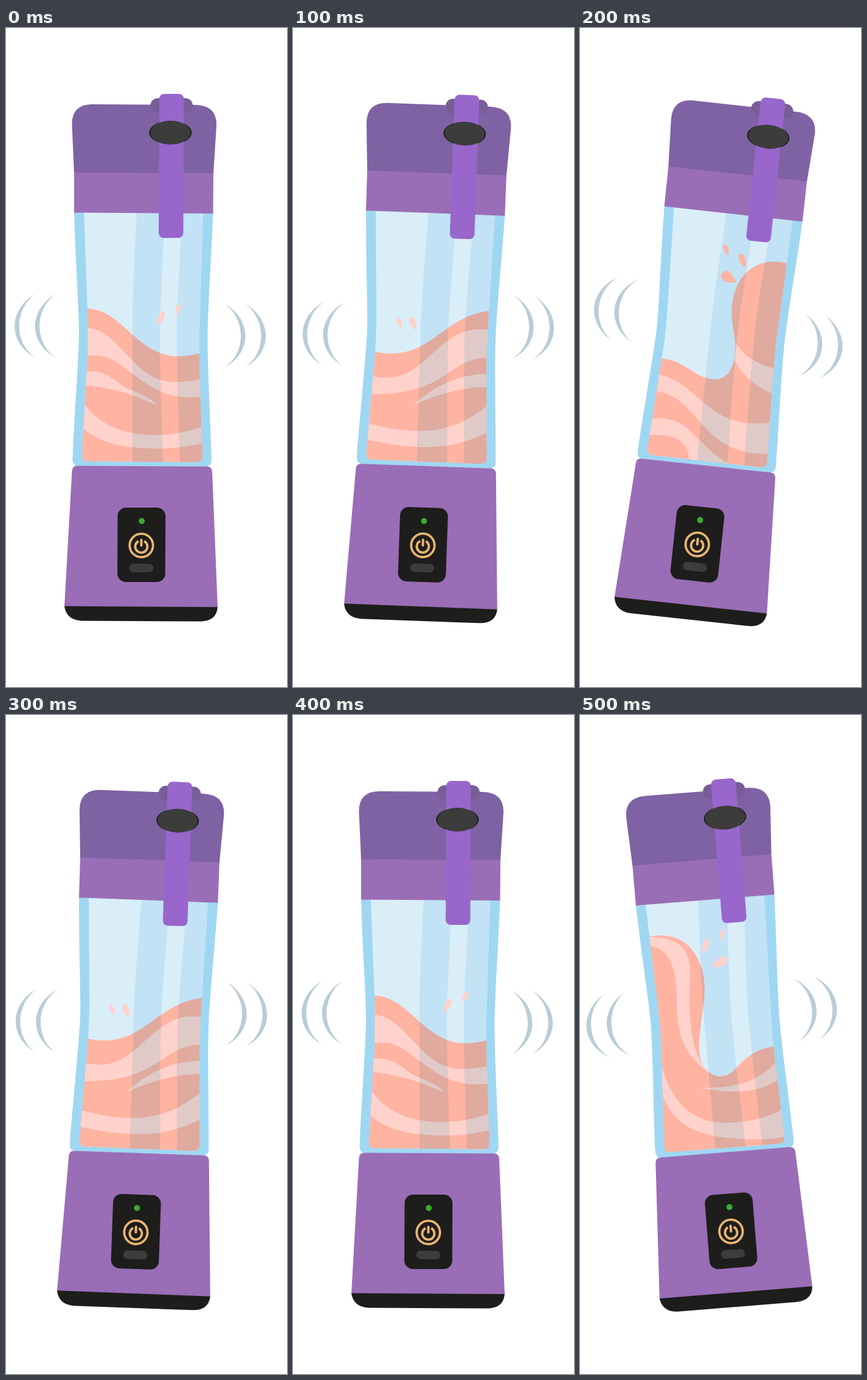
Write an HTML page that moves like this. It is 462 by 1080 pixels and loops after 600 ms.

```html
<!DOCTYPE html>
<html lang="en">
<head>
<meta charset="utf-8">
<title>Shaking blender bottle</title>
<style>
  html, body { margin: 0; width: 100%; height: 100%; overflow: hidden; background: #fff; }
  svg { display: block; width: 100%; height: 100%; }
  .plain { --liquid: #ffb3a1; --foam: #ffd2cb; }
  .shaded { --liquid: #e0aa9e; --foam: #dfcac8; }
  .liquid { fill: var(--liquid); }
  .foam { fill: var(--foam); }
</style>
</head>
<body>
<svg viewBox="0 0 462 1080">
  <defs>
    <clipPath id="inside">
      <path d="M128 302L133 435Q136 500 134 540L125 700Q125 710 134 710L313 711.5Q323 711 323 702L318 560Q317 510 318.5 480L324 303Z"/>
    </clipPath>
    <path id="bands" d="M215 302C211 380 208 440 208 500V712H258C256 640 253 570 253 500C253 460 258 380 261 303ZM290 303C286 380 281 450 281 500C281 570 284 640 286 712H330V303Z"/>
    <clipPath id="bandClip"><use href="#bands"/></clipPath>
    <path id="wave" d="M48 436C3 462 3 516 48 540C13 516 13 462 48 436Z"/>
    <g id="waves"><use href="#wave"/><use href="#wave" x="33.5"/></g>
  </defs>

  <g id="bottle">
    <g fill="#bacdd6">
      <g id="leftWaves"><use href="#waves"/></g>
      <g id="rightWaves"><use href="#waves" transform="translate(441.3 16) scale(-1 1)"/></g>
    </g>

    <path fill="#9fd7f2" d="M112 302C115 400 120 460 120 495C120 540 112 640 109.5 706Q109 718 120 718L329 718.8Q338 718 338 708C336 640 331.5 560 331.5 510C331.5 465 337 390 340.500 303Z"/>
    <g clip-path="url(#inside)">
      <rect x="100" y="300" width="250" height="420" fill="#daeef8"/>
      <use href="#bands" fill="#c2e2f5"/>
      <g class="plain"><g class="contents"></g></g>
      <g class="shaded" clip-path="url(#bandClip)"><g class="contents"></g></g>
      <g id="drops"></g>
    </g>

    <path fill="#7f62a3" d="M112 237.500L108.500 160Q107 126 141 125L312 126Q347 127 346 160L341 238.500Z"/>
    <path fill="#9a6db7" d="M112 237L341 238L340.500 304L112 302.500Z"/>
    <rect x="237.500" y="115" width="69.500" height="24" rx="12" fill="#775e97"/>
    <ellipse cx="270.300" cy="171.500" rx="35" ry="19.500" fill="#1d1d1b"/>
    <rect x="251.500" y="108" width="40.500" height="236" rx="8" fill="#9966cc" transform="rotate(.25 272 226)"/>
    <ellipse cx="270.300" cy="171.500" rx="33" ry="19.500" fill="#3c3c3b"/>

    <path fill="#9a6db7" d="M117 717.500L331 718.500Q338.500 719 339 727L348 949.500L96 948.500L108.500 726Q109 717.500 117 717.500Z"/>
    <path fill="#1d1d1b" d="M96 947.500L348 949Q346 972 320 972.500L124 971.500Q99 970 96 947.500Z"/>

    <g transform="rotate(.25 222.5 847)">
      <rect x="183.300" y="786" width="78.700" height="122" rx="14" fill="#1d1d1b"/>
      <circle cx="223" cy="808" r="5" fill="#3aaa35"/>
      <g fill="none" stroke="#e9b571" stroke-width="3.800">
        <circle cx="222.500" cy="848" r="19.200"/>
        <path d="M217.800 841A10 10 0 1 0 227.200 841"/>
        <path d="M222.500 839V848" stroke-width="4" stroke-linecap="round"/>
      </g>
      <rect x="203" y="878" width="39.500" height="14" rx="7" fill="#3c3c3b"/>
    </g>
  </g>
</svg>

<script>
const STEP = 100;
const PIVOT = "246.25 509.75";
const FOAM = "#ffd2cb", CORAL = "#ffb3a1";

// Liquid and drops are drawn in stage space; the bottle's pose is undone for them.
const upright = {
  angle: 0, shift: [0, 0], left: 0, right: 0, dropColor: FOAM,
  liquid: "M110 460H134C190 460 215 538 283 538C300 538 310 535 330 531V730H110Z",
  foam: `M120 492C185 481 205 580 275 580C300 580 310 577 330 574V605H310C230 611 195 537 150 537H120Z
    M120 565C170 556 175 580 205 593C225 602 240 608 248 618C210 602 175 588 120 585Z
    M120 604C150 650 190 668 250 667C280 666 305 660 330 650V679C290 688 270 690 240 689C190 688 150 680 120 650Z`,
  drops: `M249 487C247 474 252 465 261 465C263 472 258 483 249 487Z
    M279 470C277 459 281 453 288 453C289 461 285 467 279 470Z`
};
const tilted = {
  angle: 1.78, shift: [1.5, .75], left: 18, right: -18, dropColor: FOAM,
  liquid: "M110 526L132 530C225 550 240 475 320 464L340 462V730H100Z",
  foam: `M120 567C215 600 230 490 310 494H330V541C255 533 260 605 120 600Z
    M199 617C220 597 265 564 330 567V588C280 588 250 597 199 617Z
    M110 644C200 670 265 670 330 609V657C270 690 215 697 110 672Z`,
  drops: `M179 492C170 486 168 479 171 474C177 476 180 482 179 492Z
    M203 496C192 489 189 480 192 473C200 473 204 483 203 496Z`
};
const farRight = {
  angle: 5.87, shift: [4.75, 2.5], left: -10.4, right: 1, dropColor: CORAL,
  liquid: `M100 542H135C170 542 190 576 222 576C250 576 260 540 254 505C248 470 248 455 254 435
    C264 400 290 383 318 383C330 383 338 385 350 389L330 730H100Z`,
  foam: `M257 516C270 540 290 550 325 560V604C290 588 268 572 254.500 545Z
    M110 566C195 566 200 660 310 647L330 644V698H308C190 700 200 594 110 594Z
    M100 643C185 625 180 680 245 714L178 712C184 680 155 660 100 669Z`,
  drops: `M244 374C236 367 234 359 237 354C243 355 246 363 244 374Z
    M272 392C262 386 259 377 262 370C270 368 274 379 272 392Z
    M257 417C245 418 233 417 232 406C234 399 240 397 245 399C250 403 253 410 257 417Z`
};
const farLeft = {
  angle: -4.87, shift: [-3, -2.5], left: 6.6, right: -8.4, dropColor: FOAM,
  liquid: `M100 366C150 352 185 370 199 412C214 455 194 505 196 550C197 570 205 580 212 585
    C222 594 240 597 256 580C275 558 295 543 330 543H350V730H110Z`,
  foam: `M100 364C150 362 182 372 181 425C178 490 180 555 212 586C175 560 159 530 159 470C160 410 145 375 100 378Z
    M199 611C255 612 300 600 326 563V598C290 622 240 620 199 611Z
    M128 545C145 650 200 672 250 668C285 666 315 658 345 640V690C315 696 285 697 255 694C190 690 145 670 130 605Z`,
  drops: `M202 389C199 375 204 367 212 366C216 374 210 385 202 389Z
    M231 369C228 358 232 352 238 351C239 359 237 364 231 369Z
    M217 413C222 405 227 397 235 395C243 396 243 404 239 409C233 413 224 413 217 413Z`
};
const poses = [upright, tilted, farRight, tilted, upright, farLeft];

const byId = id => document.getElementById(id);
const setTransform = (node, value) => node.setAttribute("transform", value);
const contents = document.querySelectorAll(".contents");
let current;

function show(pose) {
  const [dx, dy] = pose.shift;
  const undo = `rotate(${-pose.angle} ${PIVOT}) translate(${-dx} ${-dy})`;
  setTransform(byId("bottle"), `translate(${dx} ${dy}) rotate(${pose.angle} ${PIVOT})`);
  setTransform(byId("leftWaves"), `translate(0 ${pose.left})`);
  setTransform(byId("rightWaves"), `translate(0 ${pose.right})`);
  for (const group of contents) {
    setTransform(group, undo);
    group.innerHTML = `<path class="liquid" d="${pose.liquid}"/><path class="foam" d="${pose.foam}"/>`;
  }
  setTransform(byId("drops"), undo);
  byId("drops").innerHTML = `<path fill="${pose.dropColor}" d="${pose.drops}"/>`;
}

const start = performance.now();
function tick(now) {
  const elapsed = Math.max(0, now - start);
  const pose = poses[Math.floor(elapsed / STEP) % poses.length];
  if (pose !== current) show(current = pose);
  requestAnimationFrame(tick);
}
tick(start);
</script>
</body>
</html>
```
